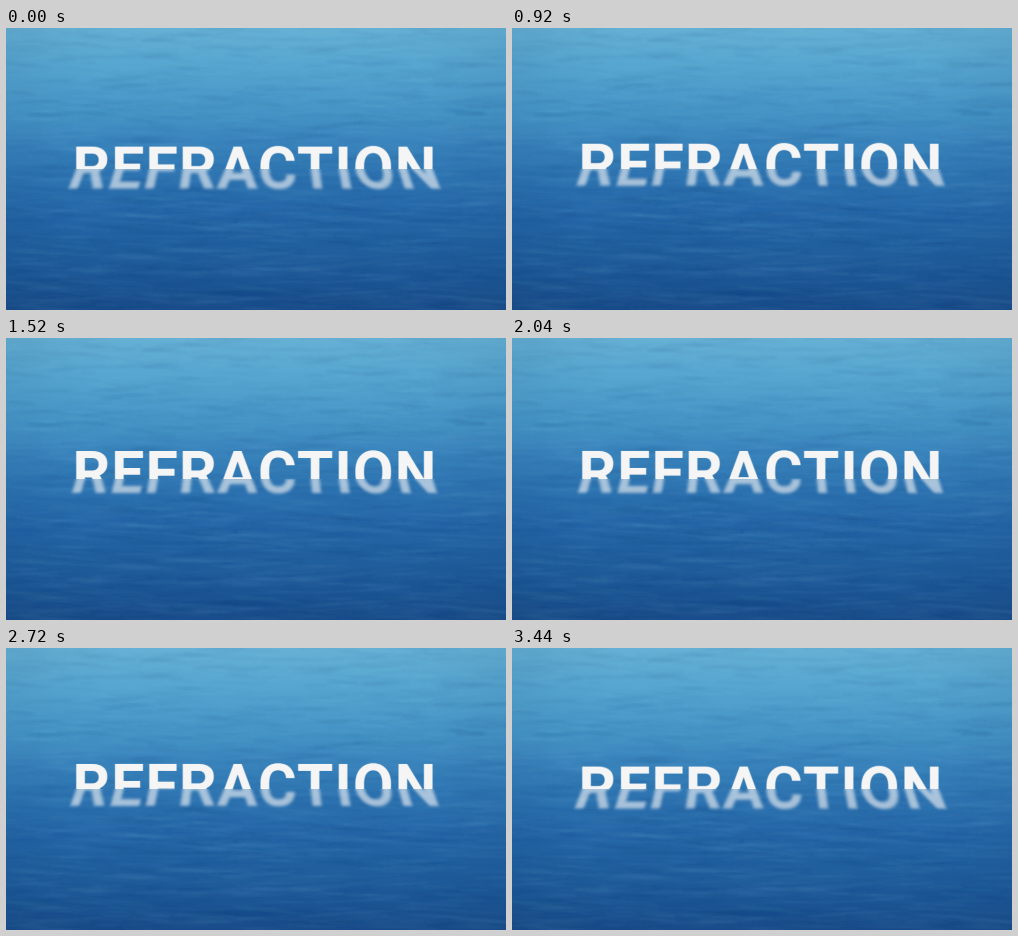
Write an HTML page with a canvas that moves like this. It is 500x282 px and loops after 3.48 s.

```html
<!DOCTYPE html>
<html lang="en">
<head>
<meta charset="utf-8">
<title>Refraction</title>
<style>
  html, body { margin: 0; width: 100%; height: 100%; overflow: hidden; background: #2f76b3; }
  canvas { display: block; width: 500px; height: 282px; }
</style>
</head>
<body>
<canvas id="stage" width="500" height="282"></canvas>
<script>
const W = 500, H = 282;
const LOOP = 3480, STEP = 40;
const WATERLINE = 141;
const CENTER = 248;
const INK_WIDTH = 357;
const TRACKING = 0.02;   // em
const WORD = 'REFRACTION';
const SHARP = 4;         // supersampling of the lettering
const PAD = 12;

const ctx = document.getElementById('stage').getContext('2d');

function makeLayer(width, height) {
  const canvas = document.createElement('canvas');
  canvas.width = Math.ceil(width);
  canvas.height = Math.ceil(height);
  return canvas.getContext('2d');
}

function seededRandom(seed) {
  return () => {
    seed = (seed * 1664525 + 1013904223) >>> 0;
    return seed / 4294967296;
  };
}

function paintWater() {
  const g = makeLayer(W, H);
  const depth = g.createLinearGradient(0, 0, 0, H);
  const tones = [
    [0, '#66b1d5'], [0.12, '#58a7d1'], [0.3, '#4594c6'], [0.5, '#3077b4'],
    [0.65, '#2567a8'], [0.85, '#1e5a99'], [1, '#194c8a']
  ];
  tones.forEach(([at, tone]) => depth.addColorStop(at, tone));
  g.fillStyle = depth;
  g.fillRect(0, 0, W, H);

  // Soft ripples grow longer and thicker towards the viewer.
  const random = seededRandom(71);
  g.filter = 'blur(0.9px)';
  for (let i = 0; i < 1800; i++) {
    const y = random() * H;
    const near = y / H;
    const length = (10 + 28 * random()) * (0.8 + 0.5 * near);
    const thickness = 0.6 + (0.6 + near) * random();
    const tilt = (random() - 0.45) * 0.2;
    const alpha = 0.02 + 0.045 * random();
    g.fillStyle = random() < 0.5 ? `rgba(150,205,230,${alpha})` : `rgba(10,60,115,${alpha})`;
    g.beginPath();
    g.ellipse(random() * W, y, length, thickness, tilt, 0, Math.PI * 2);
    g.fill();
  }
  g.filter = 'none';

  const shade = g.createRadialGradient(W / 2, H / 2, 190, W / 2, H / 2, 310);
  shade.addColorStop(0, 'rgba(5,45,90,0)');
  shade.addColorStop(1, 'rgba(5,45,90,0.1)');
  g.fillStyle = shade;
  g.fillRect(0, 0, W, H);
  return g.canvas;
}

function paintWord() {
  const g = makeLayer(1, 1);
  const useFont = size => {
    g.font = `700 ${size}px Roboto, sans-serif`;
    g.letterSpacing = `${size * TRACKING}px`;
  };
  useFont(100);
  const sample = g.measureText(WORD);
  const size = 100 * INK_WIDTH / (sample.actualBoundingBoxLeft + sample.actualBoundingBoxRight);

  useFont(size);
  const ink = g.measureText(WORD);
  const cap = g.measureText('T').actualBoundingBoxAscent;
  g.canvas.width = Math.ceil((INK_WIDTH + 2 * PAD) * SHARP);
  g.canvas.height = Math.ceil((cap + 2 * PAD) * SHARP);
  useFont(size * SHARP);
  g.fillStyle = '#f6f5f5';
  g.fillText(WORD, (PAD + ink.actualBoundingBoxLeft) * SHARP, (PAD + cap) * SHARP);
  return g.canvas;
}

const water = paintWater();
const word = paintWord();
const submerged = makeLayer(W, H);

function drawWord(g, top) {
  g.imageSmoothingQuality = 'high';
  g.drawImage(word, CENTER - INK_WIDTH / 2 - PAD, top - PAD,
    word.width / SHARP, word.height / SHARP);
}

function drawAbove(top) {
  ctx.save();
  ctx.beginPath();
  ctx.rect(0, 0, W, WATERLINE);
  ctx.clip();
  drawWord(ctx, top);
  ctx.restore();
}

function drawBelow(top, low) {
  submerged.clearRect(0, 0, W, H);
  submerged.filter = 'blur(1.5px)';
  drawWord(submerged, top);
  submerged.filter = 'none';

  const spread = 0.0017 + 0.0005 * low;
  ctx.save();
  ctx.globalAlpha = 0.61;
  for (let y = WATERLINE; y < WATERLINE + 30; y++) {
    const scale = 1 + spread * (y + 0.5 - WATERLINE);
    ctx.drawImage(submerged.canvas, 0, y, W, 1, CENTER * (1 - scale), y, W * scale, 1);
  }
  ctx.restore();
}

function draw(time) {
  const t = Math.floor((time % LOOP) / STEP) * STEP;
  const wave = Math.cos(2 * Math.PI * (t - 60) / LOOP);
  const top = 115.6 + 3 * wave;
  ctx.drawImage(water, 0, 0);
  drawBelow(top, (1 + wave) / 2);
  drawAbove(top);
}

let start;
function tick(now) {
  start ??= now;
  draw(Math.max(0, now - start));
  requestAnimationFrame(tick);
}
draw(0);
requestAnimationFrame(tick);
</script>
</body>
</html>
```
